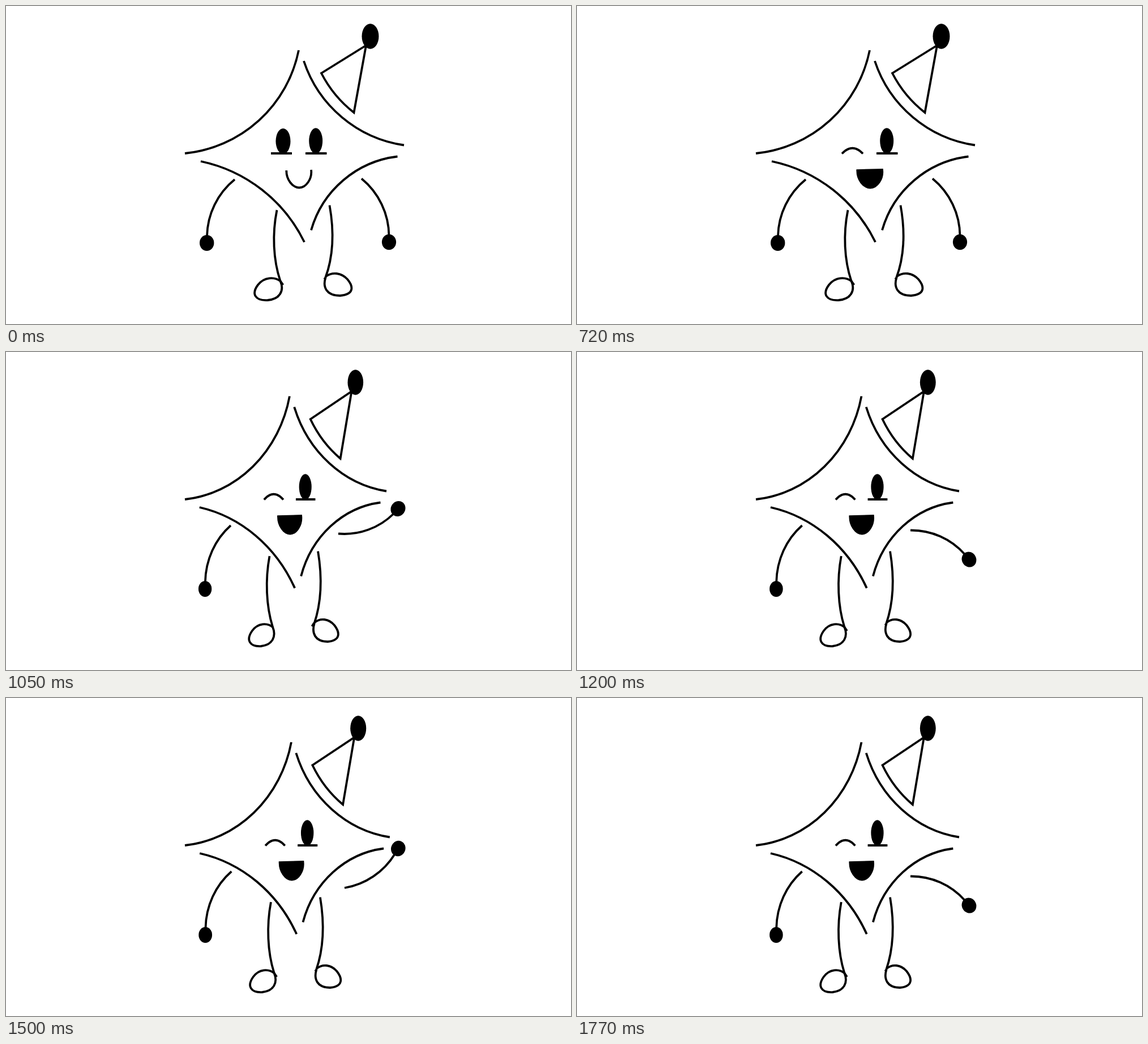
An HTML page that plays this animation: 998x561 px, repeating every 1.92 s.

```html
<!DOCTYPE html>
<html lang="en">
<head>
<meta charset="utf-8">
<title>Winking star</title>
<style>
  html, body { margin: 0; width: 100%; height: 100%; overflow: hidden; background: #fff; }
  svg { display: block; width: 100%; height: 100%; }
  path { fill: none; stroke: #000; stroke-width: 3.8; vector-effect: non-scaling-stroke; }
</style>
</head>
<body>
<svg viewBox="0 0 998 561">
  <g id="figure">
    <!-- star -->
    <path d="M517 78A228 228 0 0 1 316 260"/>
    <path d="M526 97A220 220 0 0 0 703 245.5"/>
    <path d="M344 274A264 264 0 0 1 527 416.5"/>
    <path d="M691.5 265.5A181 181 0 0 0 539 395.5"/>
    <!-- hat -->
    <path d="M557 118.5L636 69.5L614.5 188A210 210 0 0 1 557 118.5Z"/>
    <ellipse cx="643.5" cy="53.5" rx="15" ry="22.3"/>
    <!-- face -->
    <ellipse id="eye" cx="489.5" cy="238.5" rx="13" ry="22.5"/>
    <path id="lid"/>
    <ellipse cx="547.2" cy="238" rx="12" ry="22.8"/>
    <path d="M529 260H566.5"/>
    <path id="mouth"/>
    <!-- left arm -->
    <path d="M404 306A132 132 0 0 0 355 406"/>
    <ellipse cx="354.7" cy="418" rx="12.7" ry="14"/>
    <!-- legs and feet -->
    <path d="M478.5 360C470 402 472 448 484.5 485"/>
    <path d="M485.5 486C474 477 456 478 445 492C433 508 440 520 462 519C484 517 492 502 484.5 485"/>
    <path d="M571.5 351.5C579 393 580 437 564 480L562 482"/>
    <path d="M565 477C576 469 592 470 603 482C614 495 615 509 590 511C566 511 559 496 564.5 479"/>
    <path id="tick" stroke-width="2"/>
  </g>
  <path id="arm"/>
  <ellipse id="hand" rx="12.6" ry="13.8"/>
</svg>
<script>
const part = id => document.getElementById(id);
const LEFT = 316, LOOP = 1920;

const SMILE = 'M495.3 290C495 306 506 320.5 518 320.5C530 320.5 541 305 539 289';
const LEFT_TICK = 'M484.5 485L489.5 492', RIGHT_TICK = 'M564 478L560 484';

// width: horizontal scale of the body, measured from its left tip
const rest = { width: 1, arm: 'M628 304.5A132 132 0 0 1 676.5 406', hand: [676.5, 416.5, 0], tick: LEFT_TICK };
const up   = { width: .935, arm: 'M598 335A130 130 0 0 0 687 275', hand: [692.8, 265.5, 22], tick: LEFT_TICK };
const mid  = { width: .92, arm: 'M587 320.5A124 124 0 0 0 685 285', hand: [692.5, 276.5, 36], tick: RIGHT_TICK };
const down = { width: .9276, arm: 'M589 314.5A126 126 0 0 1 685 357', hand: [692.5, 366, -30], tick: LEFT_TICK };

// start time, pose, openness of the left eye, mouth open
const steps = [
  [0, rest, 1, false],
  [240, rest, .5, false],
  [480, { ...rest, tick: '' }, 0, false],
  [720, rest, 0, true],
  [930, up, 0, true],
  [1050, mid, 0, true],
  [1200, down, 0, true],
  [1350, mid, 0, true],
  [1500, up, 0, true],
  [1620, mid, 0, true],
  [1770, down, 0, true]
];

function show([, pose, eyeOpen, mouthOpen]) {
  const { width, arm, hand: [x, y, tilt], tick } = pose;
  part('figure').setAttribute('transform', `translate(${LEFT * (1 - width)}) scale(${width} 1)`);
  part('arm').setAttribute('d', arm);
  part('hand').setAttribute('transform', `translate(${x} ${y}) rotate(${tilt})`);
  part('tick').setAttribute('d', tick);
  part('eye').setAttribute('ry', 22.5 * eyeOpen);
  part('eye').setAttribute('cy', 261 - 22.5 * eyeOpen);
  part('lid').setAttribute('d', eyeOpen ? 'M468 260H505' : 'M468 260.5Q486.5 241 505 260.5');
  part('mouth').setAttribute('d', SMILE + (mouthOpen ? 'Z' : ''));
  part('mouth').style.fill = mouthOpen ? '#000' : 'none';
}

let current;
function tick() {
  const time = performance.now() % LOOP;
  const step = steps.findLast(([start]) => time >= start);
  if (step !== current) show(current = step);
  requestAnimationFrame(tick);
}
tick();
</script>
</body>
</html>
```
